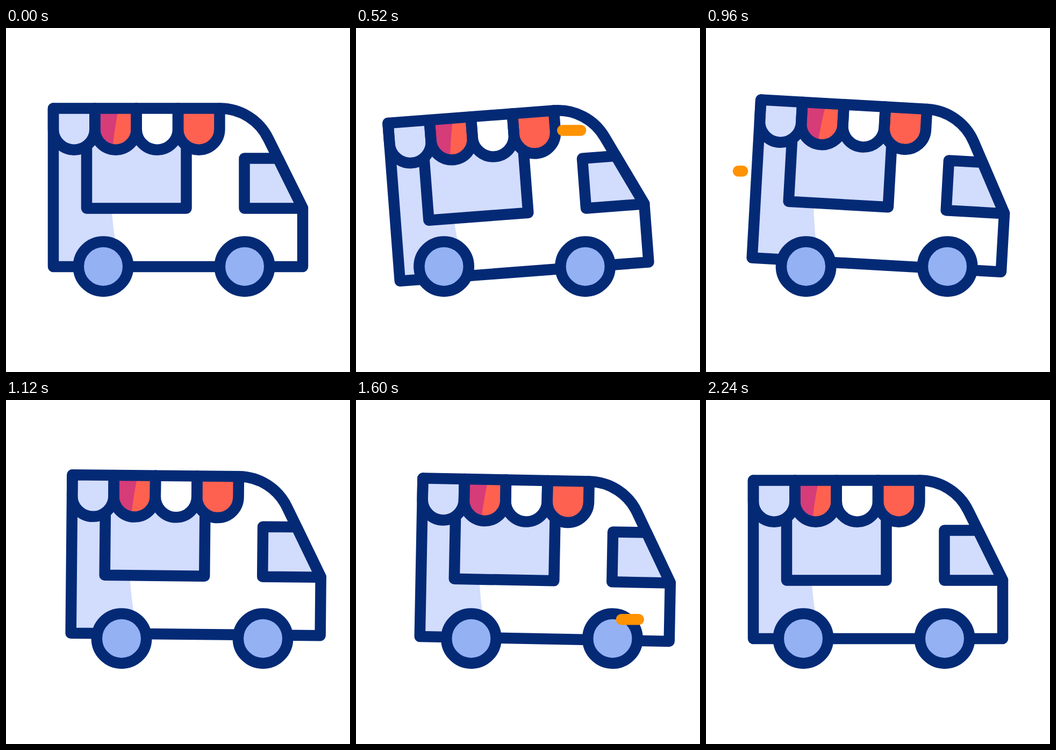
These frames come from a looping animation (640 px wide and 640 px high, 2.44 s). An HTML page:

```html
<!DOCTYPE html>
<html lang="en">
<head>
<meta charset="utf-8">
<title>Food truck</title>
<style>
html, body { margin: 0; width: 100%; height: 100%; overflow: hidden; background: #fff; }
svg { display: block; width: 100vw; height: 100vh; }
.ink { stroke: #042a76; stroke-width: 20.5; stroke-linecap: round; stroke-linejoin: round; }
.none { fill: none; }
.white { fill: #fff; }
.pale { fill: #d2dcfd; }
.red { fill: #ff6150; }
.pink { fill: #d53c78; }
.tyre { fill: #93b1f3; }
.wind { stroke: #ff9200; stroke-width: 20.5; stroke-linecap: round; }
</style>
</head>
<body>
<svg viewBox="0 0 640 640">
  <defs>
    <path id="shade" d="M88 149.5H209.5Q179 296.75 212.5 444H88Z"/>
    <clipPath id="shadeClip"><use href="#shade"/></clipPath>
  </defs>
  <g id="van">
    <g id="body">
      <path class="white" d="M88 149.5H398A100.5 100.5 0 0 1 488 206L552 335V444H88Z"/>
      <use href="#shade" class="pale"/>
      <path class="ink pale" d="M150 205V335.5H335.5V205"/>
      <path class="ink pale" d="M506 242.5H443.5V335.5H552Z"/>
      <g id="awning"></g>
      <path class="ink none" d="M88 149.5H398A100.5 100.5 0 0 1 488 206L552 335V444H88Z"/>
    </g>
    <circle class="ink tyre" cx="181" cy="443.7" r="46.2"/>
    <circle class="ink tyre" cx="444" cy="443.7" r="46.2"/>
  </g>
  <g id="winds"></g>
</svg>
<script>
const LOOP = 2440, STEP = 40;
const $ = id => document.getElementById(id);

function add(parent, tag, attrs) {
  const el = document.createElementNS("http://www.w3.org/2000/svg", tag);
  for (const key in attrs) el.setAttribute(key, attrs[key]);
  return parent.appendChild(el);
}

// Awning: four scallops of equal width
const FLAP = 77.35;
const flap = i => `M${88 + i * FLAP} 149.5V188a${FLAP / 2} ${FLAP / 2} 0 0 0 ${FLAP} 0V149.5`;
["pale", "red", "white", "red"].forEach((tone, i) => {
  add($("awning"), "path", { d: flap(i), class: tone });
  if (i === 1) add($("awning"), "path", { d: flap(i), class: "pink", "clip-path": "url(#shadeClip)" });
});
for (let i = 0; i < 4; i++) add($("awning"), "path", { d: flap(i), class: "ink none" });

// Tracks are [time, value] pairs
const drive = [[190, 0], [700, -24.1], [1292, 48], [2120, 0]];
const tilt = [[180, 0], [520, -4.35], [720, -1.5], [840, 1.1], [980, 3.3], [1120, 0.55],
              [1290, 0.1], [1600, 1.1], [1760, 1.6], [1920, 1.1], [2240, 0]];
const bob = [[180, 0], [520, 9.5], [840, 0.5], [1120, -8], [1220, -10.5], [1600, 0.5], [2240, 0]];

const clamp = p => Math.min(1, Math.max(0, p));
const sine = p => (1 - Math.cos(Math.PI * clamp(p))) / 2;

function find(track, t) {
  let i = 0;
  while (i < track.length - 2 && t > track[i + 1][0]) i++;
  return i;
}

function eased(track, t) {
  const i = find(track, t), [t0, a] = track[i], [t1, b] = track[i + 1];
  return a + (b - a) * sine((t - t0) / (t1 - t0));
}

// Slope is flat at the ends and at turning points
function slope(track, i) {
  if (i === 0 || i === track.length - 1) return 0;
  const [[t0, a], [t1, b], [t2, c]] = track.slice(i - 1, i + 2);
  return (b - a) * (c - b) <= 0 ? 0 : (c - a) / (t2 - t0);
}

function smooth(track, t) {
  const i = find(track, t), [t0, a] = track[i], [t1, b] = track[i + 1];
  const d = t1 - t0, p = clamp((t - t0) / d), q = 1 - p;
  return a * q * q * (1 + 2 * p) + b * p * p * (1 + 2 * q)
    + d * p * q * (q * slope(track, i) - p * slope(track, i + 1));
}

// Streaks: the head runs ahead and the tail catches up
const winds = [
  { y: 190.5, from: 568, to: 384, start: 257, head: 270, tail: 367 },
  { y: 266.3, from: 568, to: 60, start: 629, head: 270, tail: 360 },
  { y: 408.3, from: 568, to: 95, start: 1530, head: 270, tail: 362 }
];
for (const w of winds) w.el = add($("winds"), "line", { class: "wind", y1: w.y, y2: w.y });

function draw(t) {
  $("van").setAttribute("transform", `translate(${eased(drive, t)} 0)`);
  $("body").setAttribute("transform", `translate(0 ${smooth(bob, t)}) rotate(${smooth(tilt, t)} 320 305)`);
  for (const w of winds) {
    const age = t - w.start;
    const at = span => w.from + (w.to - w.from) * sine(age / span);
    w.el.setAttribute("x1", at(w.head));
    w.el.setAttribute("x2", at(w.tail));
    w.el.setAttribute("visibility", age > 0 && age < w.tail ? "visible" : "hidden");
  }
}

const begin = performance.now();
function tick() {
  const t = (performance.now() - begin) % LOOP;
  draw(Math.floor(t / STEP) * STEP);
  requestAnimationFrame(tick);
}
draw(0);
requestAnimationFrame(tick);
</script>
</body>
</html>
```
